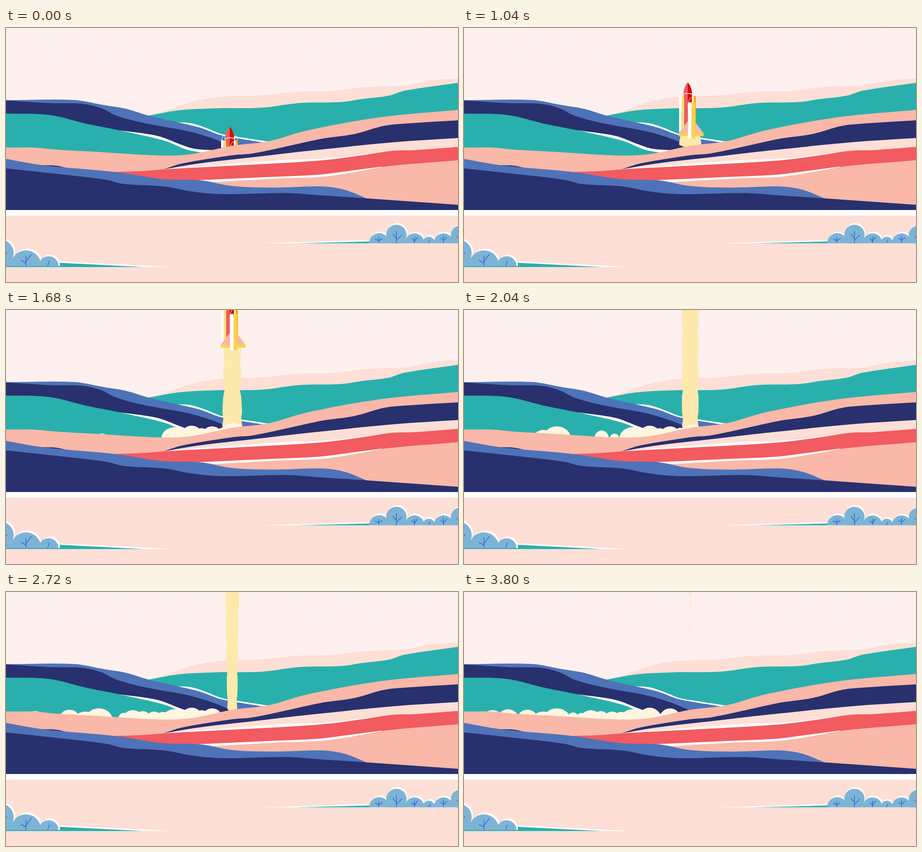
Animation of 998 by 561 pixels, one loop 3.84 s. Source, as an HTML page:

```html
<!DOCTYPE html>
<html lang="en">
<head>
<meta charset="utf-8">
<title>Lift-off over the hills</title>
<style>
  html, body { margin: 0; width: 100%; height: 100%; overflow: hidden; background: #fef0ee; }
  svg { display: block; width: 100vw; height: 100vh; }
</style>
</head>
<body>
<svg viewBox="0 0 998 561" preserveAspectRatio="none">
  <defs>
    <clipPath id="rightBase"><path d="M790 420H998V475.5H790Z"/></clipPath>
    <clipPath id="leftBase"><path d="M0 450H130V526H0Z"/></clipPath>
    <g id="rightBush">
      <circle cx="824" cy="475" r="22"/><circle cx="862" cy="457" r="22.5"/>
      <circle cx="902" cy="475" r="21.5"/><circle cx="933.5" cy="474" r="13"/>
      <circle cx="966" cy="475" r="21.5"/><circle cx="1004" cy="458" r="22"/>
      <path d="M844 455H882V476H844ZM984 458H998V476H984Z"/>
    </g>
    <g id="leftBush">
      <circle cx="-12" cy="497" r="29"/><circle cx="44" cy="524" r="33"/>
      <circle cx="94" cy="526" r="22"/><path d="M0 497H15V527H0Z"/>
    </g>
  </defs>

  <rect width="998" height="561" fill="#fef0ee"/>
  <g stroke="#fff" stroke-linecap="round">
    <path stroke-width="2" d="M36 7h0M69 9h0M105 28h0M204 46h0M235 12h0M345 15h0M378 67h0M460 20h0M478 0h0M530 44h0M540 7h0M716 38h0M775 14h0M837 3h0M874 17h0M894 9h0"/>
    <path stroke-width="3" d="M118.5 49h0M171 37h0M627 9h0M663 57h0M754 34.5h0"/>
    <path stroke-width="4" d="M300 54h0M428 17h0M825 43.5h0M926 5h0"/>
  </g>

  <g id="back"></g>
  <path id="plume" fill="#fce9ab"/>
  <g id="rocket">
    <path fill="#fff" d="M503 30H508V90H503ZM475 30H480.5V111H475Z"/>
    <path fill="#fba918" d="M507 30H512V92H507Z"/>
    <path fill="#ffe27a" d="M480.5 30H486V111H480.5Z"/>
    <path fill="#f25b60" d="M494 0C488 6 484 17 484.5 28L486 34V112H494.5Z"/>
    <path fill="#d60b00" d="M494 0C500 6 504 17 503.5 28L503 48H494Z"/>
    <g fill="none" stroke="#fff">
      <path d="M476 30L478 22Q480 18 482 22L485 30M504 30L505.5 21Q508 18 509.5 22L511.5 30M495 44L499 35Q500 33 504 34L506 44"/>
      <path stroke="#fddfd6" stroke-width="1.8" d="M483 27Q494 21.5 506 27"/>
    </g>
    <path fill="#f9b8a8" d="M494 86L474 112H495ZM510 87L529 112H510Z"/>
    <path fill="#ffd34a" d="M474 112H495V118.5H474ZM510 112H529V118.5H510Z"/>
    <path fill="#fff" d="M494.5 44H502.5V124H494.5Z"/>
    <path fill="#ffd34a" d="M502.5 44H510.5V124H502.5Z"/>
  </g>
  <g id="smoke" fill="#fef6e0"></g>
  <g id="front"></g>

  <rect y="402" width="998" height="13" fill="#fff"/>
  <rect y="414.5" width="998" height="146.5" fill="#fddfd6"/>

  <path fill="#fff" d="M560 475.5L802 468.5V475.5Z"/>
  <path fill="#29b0ac" d="M640 475.5L802 471.5V475.5Z"/>
  <g clip-path="url(#rightBase)">
    <use href="#rightBush" x="2" y="-3.5" fill="#fff"/>
    <use href="#rightBush" fill="#7db3d5"/>
  </g>
  <path fill="#fff" d="M116 515.5L368 528H116Z"/>
  <path fill="#29b0ac" d="M0 525.5H118V518.5L305 528H0Z"/>
  <g clip-path="url(#leftBase)">
    <use href="#leftBush" x="3" y="-3.5" fill="#fff"/>
    <use href="#leftBush" fill="#7db3d5"/>
  </g>
  <path fill="none" stroke="#2f66db" stroke-width="1.5" d="M823 475V462M815 466L823 470L831 465M862 475V449M854 455L862 465M862 469L874 457M902 475V461M896 465L902 471L909 461M933 475L936 468M966 475V459M959 464L966 469L974 462M995 460L998 463M44 525V503M33 513L44 519M44 516L56 500M92 525L96 514M0 495L2 499"/>
</svg>

<script>
const LOOP = 3840, STEP = 40;
const TEAL = '#29b0ac', NAVY = '#28306e', BLUE = '#4f73b8', PALE = '#fddfd6',
      SALMON = '#f9b8a8', RED = '#f25b60', WHITE = '#fff';
const $ = id => document.getElementById(id);

function add(parent, tag, attrs) {
  const el = document.createElementNS('http://www.w3.org/2000/svg', tag);
  for (const name in attrs) el.setAttribute(name, attrs[name]);
  return parent.appendChild(el);
}

// Smooth ridge through a few points, filled down to a floor
function hill(layer, fill, points, floor = 402) {
  const pts = points.split(' ').map(p => p.split(',').map(Number));
  const n = pts.length - 1;
  const slope = i => {
    const u = pts[Math.max(i - 1, 0)], v = pts[Math.min(i + 1, n)];
    return (v[1] - u[1]) / (v[0] - u[0]);
  };
  let d = 'M' + pts[0];
  for (let i = 0; i < n; i++) {
    const [x0, y0] = pts[i], [x1, y1] = pts[i + 1], h = (x1 - x0) / 3;
    d += `C${x0 + h} ${y0 + h * slope(i)} ${x1 - h} ${y1 - h * slope(i + 1)} ${x1} ${y1}`;
  }
  add($(layer), 'path', { fill, d: `${d}V${floor}H${pts[0][0]}Z` });
}

hill('back', PALE, '312,193 350,184 410,163 470,152.5 560,149 640,141 715,139.5 800,130 880,127 940,115.5 998,112');
hill('back', TEAL, '308,195 380,182 460,177.5 565,176 650,165.5 740,163.5 785,157 845,149.5 880,138.5 998,121');
hill('back', WHITE, '376,208 410,210.5 445,222 475,234 515,241 590,252.5');
hill('back', BLUE, '0,159.5 150,159 215,170 265,178.5 313,193 380,208.5 430,220.5 470,235.5 510,243.5 570,253');
hill('back', NAVY, '0,160 100,166 170,167.5 210,177 245,194 310,211 400,227.5 455,243.5 500,262');
hill('back', WHITE, '250,226 335,238.5 385,257 415,266.5 458,270');
hill('back', TEAL, '0,189 95,192 180,212 258,227.5 350,249 400,269 432,275');

hill('front', SALMON, '0,264 60,264 110,268.5 200,273.5 340,281.5 410,278.5 500,260 580,250 670,225 830,196.5 998,181');
hill('front', NAVY, '348,312 390,299 500,281 545,277 635,258 700,244 770,234 835,216 890,210.5 998,204');
hill('front', PALE, '348,312 420,300 540,286 680,270 860,252 998,243');
hill('front', WHITE, '370,310 440,304 600,292.5 720,287 790,279 860,271');
hill('front', RED, '240,318 300,316 360,311.5 520,303 690,293 780,282 855,271 900,270 998,262.5');
hill('front', WHITE, '425,336 580,329 690,324 770,314 830,306');
hill('front', SALMON, '450,341 600,332.5 700,328.5 780,316.5 840,305.5 998,292');
hill('front', NAVY, '78,303 110,304 143,311', 316);
hill('front', BLUE, '0,289 80,303 245,318.5 345,333.5 430,336.5 500,349 590,352.5 700,350 750,358 800,378');
hill('front', NAVY, '0,310 120,323 220,335 260,344.5 350,350 410,361 475,367 620,364.5 700,370 800,376.5 998,390.5');

const ramp = (t, from, to) => {
  const k = Math.min(1, Math.max(0, (t - from) / (to - from)));
  return k * k * (3 - 2 * k);
};

// Smoke puffs swell out from behind the ridge: x, top, radius, birth, sink time
const SOIL = 284;
const puffs = [
  [502, 250, 35, 980, 1900], [478, 260, 18, 1080, 2100], [455, 257, 25, 950], [432, 261, 20, 980, 3300],
  [410, 255.5, 27, 950], [372, 259, 29, 1080], [347, 265, 20, 2100], [327, 264, 19, 1800],
  [302, 263, 19, 1700], [280, 261, 24, 2200], [259, 267, 12, 2250], [241, 266, 14, 2850],
  [205, 257, 31, 1480], [175, 264, 24, 1650], [140, 260, 24, 1900], [97, 259, 25, 2850], [63, 261, 25, 2350]
].map(([x, top, r, birth, sink = LOOP]) => ({ x, top, r, birth, sink, el: add($('smoke'), 'ellipse', { cy: SOIL }) }));

function drawPuff({ x, top, r, birth, sink, el }, t) {
  const k = ramp(t, birth, birth + 450) * (1 - ramp(t, sink, sink + 800));
  el.setAttribute('cx', x + 12 * (1 - k));
  el.setAttribute('rx', r * k);
  el.setAttribute('ry', (SOIL - top) * k);
}

// Exhaust column: thins from below, pinches into drops, then breaks into dashes
function plumePath(t, top) {
  const age = Math.max(0, (t - 1360) / 2440);
  const width = 19 * (1 - age ** 2.5) + 0.6;
  const flare = 5 * (1 - ramp(t, 1360, 2040));
  const pinch = 0.12 + 1.8 * ramp(t, 2700, 3360);
  const dash = 4 * ramp(t, 3320, 3800);
  const end = 264 - 172 * ramp(t, 3320, 3800);
  const left = [], right = [];
  for (let y = Math.max(top, -4); y <= end; y += 1.5) {
    const taper = Math.max(0, 1 - 1.6 * age ** 3 * y / 258);
    const neck = Math.cos(Math.PI * (y - 112) / 64) ** 8;
    const ripple = Math.cos(2 * Math.PI * (y - 5) / 24) - 0.3;
    const tip = Math.sqrt(Math.min(1, (end - y) / 6));
    const half = tip * Math.max(0, width * taper * (1 - pinch * neck + dash * ripple) + flare * ramp(y, 175, 240));
    left.push(`${499.5 - half} ${y}`);
    right.unshift(`${499.5 + half} ${y}`);
  }
  return left.length ? `M${left.concat(right).join('L')}Z` : '';
}

function draw(t) {
  const s = t / 1000;
  const tip = 218 - (44.6 * s + 22.2 * s * s + 24.4 * s ** 3);
  $('rocket').setAttribute('transform', `translate(0 ${tip})`);
  $('plume').setAttribute('d', plumePath(t, tip + 118));
  for (const p of puffs) drawPuff(p, t);
}

const start = performance.now();
function tick() {
  const t = (performance.now() - start) % LOOP;
  draw(Math.floor(t / STEP) * STEP);
  requestAnimationFrame(tick);
}
draw(0);
requestAnimationFrame(tick);
</script>
</body>
</html>
```
